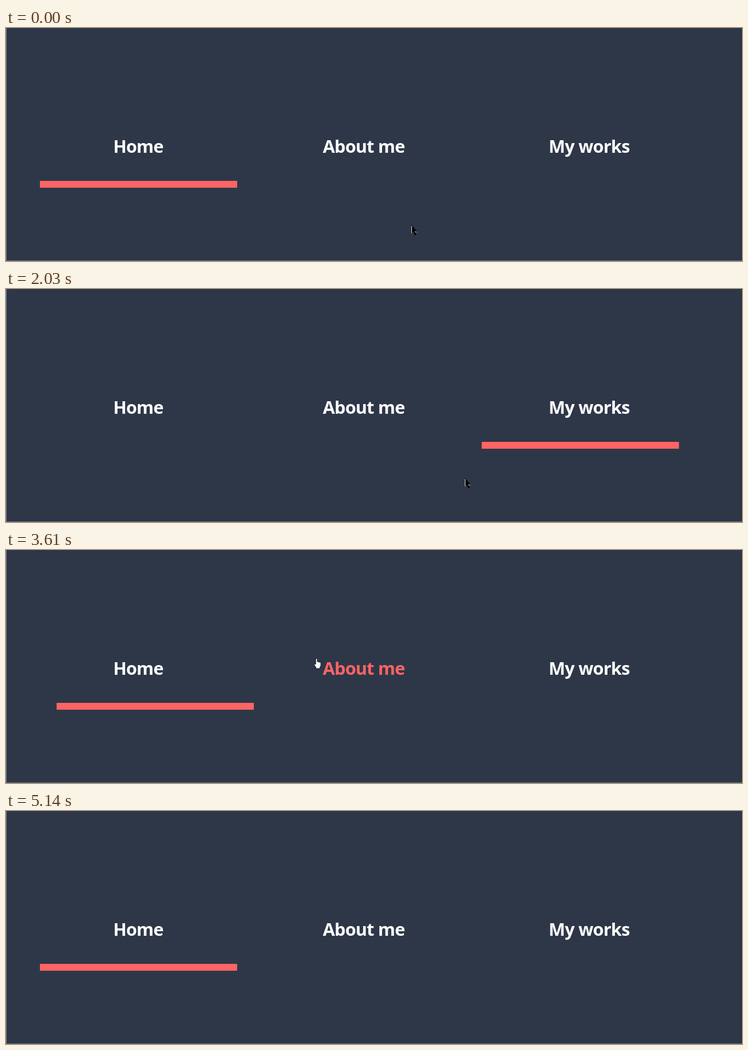
Write an HTML page that moves like this. It is 1280 px wide and 407 px high and loops after 5.78 s.

```html
<!DOCTYPE html>
<html lang="en">
<head>
<meta charset="utf-8">
<title>Menu underline</title>
<style>
  :root { --red: #ff6464; --loop: 5780ms; }
  html, body { margin: 0; width: 100%; height: 100%; overflow: hidden; background: #2e3748; }
  svg { display: block; width: 100vw; height: 100vh; }

  text {
    font: 700 30.5px "Noto Sans", "Open Sans", sans-serif;
    letter-spacing: -.75px;
    text-anchor: middle;
    fill: #fff;
  }
  .home, .about, .works, .arrow, .hand { animation: var(--loop) step-end infinite; }
  .home  { animation-name: home; }
  .about { animation-name: about; }
  .works { animation-name: works; }
  .arrow { animation-name: arrow; }
  .hand  { animation-name: hand; }
  .bar { fill: var(--red); animation: bar var(--loop) ease infinite; }
  .cursor { animation: move var(--loop) linear infinite; }

  /* The underline eases to a link after each click. */
  @keyframes bar {
    0%, 19.9% { transform: translateX(0); }
    26.12%, 30.45% { transform: translateX(391.5px); }
    36.68%, 48.29% { transform: translateX(783.5px); }
    54.52%, 61.94% { transform: translateX(0); }
    68.17%, 72.49% { transform: translateX(391.5px); }
    78.72%, 100% { transform: translateX(0); }
  }

  @keyframes home {
    0%, 43.43%, 57.9%, 73.4%, 100% { fill: #fff; }
    40.83%, 45.3%, 70.76% { fill: var(--red); }
  }
  @keyframes about {
    0%, 28.37%, 68.9%, 78.9%, 100% { fill: #fff; }
    13.5%, 58.7%, 78.1% { fill: var(--red); }
  }
  @keyframes works {
    0%, 32.6%, 100% { fill: #fff; }
    28.37% { fill: var(--red); }
  }

  @keyframes hand {
    0%, 26.54%, 32.3%, 42.47%, 57.54%, 68.34%, 73.05%, 78.49%, 100% { visibility: hidden; }
    13.1%, 27.65%, 39.92%, 44.9%, 58.33%, 69.79%, 77.66% { visibility: visible; }
  }
  @keyframes arrow {
    0%, 26.54%, 32.3%, 42.47%, 57.54%, 68.34%, 73.05%, 78.49% { visibility: visible; }
    13.1%, 27.65%, 39.92%, 44.9%, 58.33%, 69.79%, 77.66%, 88.93%, 100% { visibility: hidden; }
  }

  @keyframes move {
    0%, 9.17% { transform: translate(705px, 344px); }
    10.73% { transform: translate(695px, 310px); }
    12.46% { transform: translate(672px, 245px); }
    13.67% { transform: translate(664px, 221px); }
    14.53%, 22.15% { transform: translate(663px, 219px); }
    24.22% { transform: translate(690px, 225px); }
    27.85%, 28.37% { transform: translate(851px, 226px); }
    29.93%, 31.83% { transform: translate(955px, 225px); }
    33.39% { transform: translate(930px, 245px); }
    35.12% { transform: translate(800px, 330px); }
    35.99% { transform: translate(700px, 338px); }
    38.06% { transform: translate(520px, 270px); }
    40.31% { transform: translate(379px, 194px); }
    41.52% { transform: translate(280px, 190px); }
    42.39% { transform: translate(225px, 184px); }
    42.91%, 43.43% { transform: translate(213px, 179px); }
    44.29% { transform: translate(208px, 182px); }
    45.85% { transform: translate(212px, 186px); }
    50.35% { transform: translate(214px, 185px); }
    53.46%, 53.98% { transform: translate(217px, 189px); }
    55.36% { transform: translate(270px, 205px); }
    58.82% { transform: translate(480px, 195px); }
    60.55%, 64.01% { transform: translate(540px, 189px); }
    66.61% { transform: translate(520px, 215px); }
    68.34% { transform: translate(450px, 228px); }
    70.07%, 70.76% { transform: translate(393px, 228px); }
    71.45%, 73.01% { transform: translate(365px, 229px); }
    74.39% { transform: translate(385px, 280px); }
    75.61% { transform: translate(430px, 338px); }
    76.99% { transform: translate(490px, 270px); }
    78.89% { transform: translate(555px, 160px); }
    80.97%, 85.12% { transform: translate(585px, 102px); }
    86.51% { transform: translate(598px, 143px); }
    87.89% { transform: translate(580px, 100px); }
    88.93%, 100% { transform: translate(578px, 81px); }
  }
</style>
</head>
<body>
<svg viewBox="0 0 1280 407" preserveAspectRatio="none">
  <rect width="1280" height="407" fill="#2e3748"/>
  <path d="M1279.5 0V407" stroke="#232b39" stroke-dasharray="4 4"/>
  <path d="M.5 0V407" stroke="#858a93"/>
  <path d="M0 406.5H1280" stroke="#6d727b"/>

  <text class="home" x="230" y="218">Home</text>
  <text class="about" x="622.3" y="218">About me</text>
  <text class="works" x="1014.2" y="218">My works</text>
  <rect class="bar" x="59" y="267" width="343" height="12"/>

  <g class="cursor">
    <g class="arrow">
      <path d="M0 0V15L3.5 12 6 18 8.5 17 6.5 12H10.5Z" fill="#000"/>
      <path d="M.5 2V14.5M5.5 12H9.5" stroke="#dfe2e6"/>
    </g>
    <path class="hand" d="M-1.2 1Q0 -.5 1.4 1V6L6.4 7.2Q7.7 7.7 7.6 9.5V13L6 15.5V18H-1V16L-4 11.5Q-4 9.5-1.2 10.5Z"
      fill="#fff" stroke="#10141b" stroke-width=".9" stroke-linejoin="round"/>
  </g>
</svg>
</body>
</html>
```
